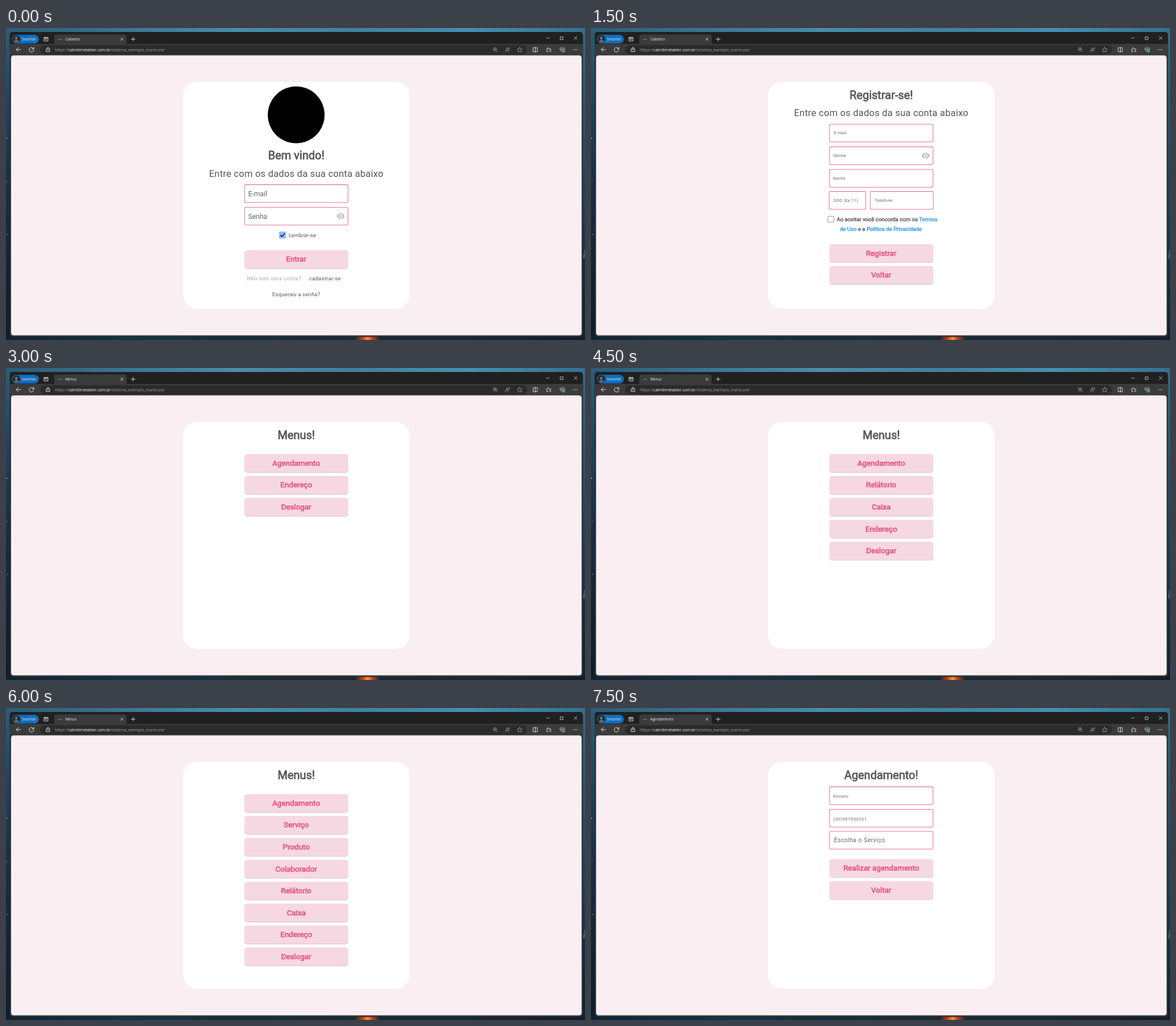
An HTML page with a canvas for the animation above (9 s loop, 1020 by 549 pixels).

```html
<!DOCTYPE html>
<html lang="pt-BR">
<head>
<meta charset="utf-8">
<title>Agendamento</title>
<style>
  html, body { margin: 0; width: 100%; height: 100%; overflow: hidden; background: #0f1c2c; }
  canvas { display: block; width: 1020px; height: 549px; }
</style>
</head>
<body>
<canvas id="stage" width="1020" height="549"></canvas>
<script>
const ctx = document.getElementById('stage').getContext('2d');
const STEP = 1500;
const UI = '"Open Sans", "Noto Sans", sans-serif';
const APP = 'Roboto, Arial, sans-serif';
const MID = 511.3;
const INK = '#555555', PINK = '#e8487f', BORDER = '#e8719b', BLUE = '#2196f3';

function box(x, y, w, h, r, fill, line, width = 1) {
  ctx.beginPath();
  ctx.roundRect(x, y, w, h, r);
  if (fill) { ctx.fillStyle = fill; ctx.fill(); }
  if (line) { ctx.strokeStyle = line; ctx.lineWidth = width; ctx.stroke(); }
}

function disc(x, y, r, fill) {
  ctx.beginPath();
  ctx.arc(x, y, r, 0, Math.PI * 2);
  ctx.fillStyle = fill;
  ctx.fill();
}

function path(d, color, width = 1, fill = false) {
  const p = new Path2D(d);
  if (fill) { ctx.fillStyle = color; ctx.fill(p); return; }
  ctx.strokeStyle = color;
  ctx.lineWidth = width;
  ctx.stroke(p);
}

// Heavy text is the regular face with a thin outline.
function text(s, x, y, size, { color = INK, font = APP, gap = 0, align = 'left', heavy = false } = {}) {
  ctx.font = `${size}px ${font}`;
  ctx.letterSpacing = gap + 'px';
  ctx.textAlign = align;
  ctx.fillStyle = color;
  ctx.fillText(s, x, y);
  if (heavy) {
    ctx.strokeStyle = color;
    ctx.lineWidth = size / 26;
    ctx.lineJoin = 'round';
    ctx.strokeText(s, x, y);
  }
  return x + ctx.measureText(s).width;
}

function gradient(x0, y0, x1, y1, ...colors) {
  const g = ctx.createLinearGradient(x0, y0, x1, y1);
  colors.forEach((c, i) => g.addColorStop(i / (colors.length - 1), c));
  return g;
}

function wallpaper() {
  ctx.fillStyle = gradient(0, 0, 0, 549, '#2c5c78', '#1d4460', '#15304a', '#10253a', '#0d1d2d');
  ctx.fillRect(0, 0, 1020, 549);
  ctx.fillStyle = gradient(0, 0, 1020, 0, '#2c5b76', '#3b7592', '#4b8ca9', '#417f9e', '#488eb0', '#35708f');
  ctx.fillRect(0, 0, 1020, 8);
  ctx.fillStyle = gradient(0, 0, 0, 549, '#32708f', '#27597a', '#1d4564', '#16304a', '#101f31');
  ctx.fillRect(1014, 0, 6, 549);
  ctx.fillStyle = gradient(0, 0, 1020, 0, '#0e2232', '#123246', '#15303f', '#182a37', '#15283a', '#101c2b');
  ctx.fillRect(0, 541, 1020, 8);
  const glow = ctx.createRadialGradient(637, 547, 0, 637, 547, 22);
  glow.addColorStop(0, '#ff9a45');
  glow.addColorStop(0.35, '#c8451f');
  glow.addColorStop(1, '#c8451f00');
  ctx.fillStyle = glow;
  ctx.fillRect(612, 542, 50, 7);
  disc(1, 194, 1, '#a9bccb');
  disc(2, 270, 1.2, '#8a3d38');
  disc(3, 363, 0.9, '#7f93a4');
  path('M1017 404L1020 390M1018 406L1020 398', '#7d8a95', 0.8);
}

function toolbarIcons() {
  const c = '#e4e4e4', dim = '#a5a5a5';
  ctx.lineCap = 'round';
  path('M26 38H18M21.5 34.5L18 38L21.5 41.5', c);
  path('M48.6 36.5A4 4 0 1 0 49 38.8M49 34V36.8H46.2', c);
  path('M71.2 37H77V41.5H71.2ZM72.4 37V35.7A1.7 1.7 0 0 1 75.8 35.7V37M74 39V39.4', c, 0.9);
  path('M864.4 37.4A3 3 0 1 1 858.4 37.4A3 3 0 1 1 864.4 37.4M863.6 39.6L866 42M860 37.4H862.8M861.4 36V38.8', dim, 0.8);
  path('M879.5 42L882.5 34.5L885.5 42M880.6 39.4H884.4M885.3 35Q886.4 36 885.3 37.4M886.6 34Q888.4 36 886.6 38.3', dim, 0.8);
  const star = (x, y, r) => {
    let d = '';
    for (let i = 0; i < 10; i++) {
      const a = -Math.PI / 2 + i * Math.PI / 5, q = i % 2 ? r * 0.48 : r;
      d += (i ? 'L' : 'M') + (x + q * Math.cos(a)) + ' ' + (y + q * Math.sin(a));
    }
    return d + 'Z';
  };
  path(star(905, 38.6, 4.8), dim, 0.8);
  path('M929 34.8H936V41.6H929ZM932.5 34V42.5', c, 0.9);
  path('M955 41L952.7 42L953.1 39.1L951.8 37.2L954 36.8L955.3 34.3L956.6 36.8H960M957.4 39H960M957.4 41.3H960', c, 0.9);
  path('M980 42L976.3 38.3C974.6 35.9 977.7 33 980 35.9C982.3 33 985.4 35.9 983.7 38.3ZM976.6 38H978.7L979.8 36.8L981 39.3L981.8 38H983', c, 0.8);
  disc(982.6, 40.8, 2.4, '#43a854');
  [1000, 1003, 1006].forEach(x => disc(x, 38.3, 0.8, c));
  path('M67.3 16.5H74V23H67.3ZM67.3 18H74M69.2 18V20.2H72', c, 0.9);
  path('M202.3 17.8L206.3 21.8M206.3 17.8L202.3 21.8', c, 0.9);
  path('M220.5 19.7H227.5M224 16.2V23.2', c, 0.9);
  path('M952 17.8H957M976.7 15.7H981.3V20.3H976.7ZM1001 15.2L1006 20.2M1006 15.2L1001 20.2', c, 0.8);
  ctx.lineCap = 'butt';
}

function browser(title) {
  box(6.5, 7, 1010, 536.5, 5, '#202020');
  ctx.fillStyle = '#3b3b3b';
  ctx.fillRect(7, 28, 1009, 20);
  box(7, 44, 1009, 499, [0, 0, 5, 5], '#3b3b3b');
  box(85, 11.5, 127.5, 18, [4, 4, 0, 0], '#3b3b3b');
  box(10.5, 12, 47.5, 15.2, 7.6, '#0f6cbd');
  disc(18.4, 19.7, 6.6, '#262626');
  disc(18.2, 17.8, 2.3, '#85786f');
  path('M14.3 24.6Q14.8 20.5 18.3 20.5Q21.9 20.5 22.5 24.6Q18.4 27 14.3 24.6Z', '#6b6765', 1, true);
  const light = { font: UI, color: '#f4f4f4' };
  text('SoloVisit', 28, 22.1, 6.3, light);
  path('M91.5 20H98.5', '#9b9b9b', 0.9);
  text(title, 104.5, 22.1, 6.2, light);
  box(60, 30.2, 858, 16.2, 8, '#2b2b2b');
  const dim = { font: UI, color: '#a3a3a3' };
  let x = text('https://', 86, 40.8, 7, dim);
  x = text('calmtimetabler.com.br', x, 40.8, 7, { font: UI, color: '#ffffff' });
  text('/sistema_exemplo_manicure/', x, 40.8, 7, dim);
  toolbarIcons();
  box(9, 48.3, 1005, 492.5, 4.5, '#f9eff3');
  box(312, 95, 399, 399, 24, '#ffffff');
}

const title = (s, y) => text(s, MID, y, 20, { align: 'center', heavy: true, color: '#585858' });
const lead = y => text('Entre com os dados da sua conta abaixo', MID, y, 16.5, { align: 'center', gap: 0.25 });

function button(label, y) {
  box(420, y + 0.9, 183, 32, 5, '#d9c3cb');
  box(420, y, 183, 32, 5, '#f6d8e2');
  text(label, MID, y + 20.4, 13.45, { align: 'center', heavy: true, color: PINK });
}

function field(label, y, size = 7.6, { x = 420.3, w = 182.2, pad = 6.5, gap = 0.25, base = 18.2 } = {}) {
  box(x, y, w, 31.3, 2.2, '#ffffff', BORDER, 1.05);
  text(label, x + pad, y + base, size, { gap, color: '#666666' });
}

function eye(y) {
  path(`M582.3 ${y}Q585 ${y - 5} 589.5 ${y - 5}T596.7 ${y}Q594 ${y + 5} 589.5 ${y + 5}T582.3 ${y}Z`, '#bcbec5', 1, true);
  disc(589.5, y, 3.3, '#ffffff');
  disc(589.5, y, 2, '#bcbec5');
}

function login() {
  disc(511.2, 152.8, 50, '#000000');
  title('Bem vindo!', 231);
  lead(261.8);
  field('E-mail', 275.6, 12, { gap: 0, base: 20 });
  field('Senha', 315.5, 12, { gap: 0, base: 20 });
  eye(331);
  box(481, 358.2, 12.2, 12.2, 1.2, '#8fbdf6');
  path('M483.3 364.4L486 367.1L491 361.4', '#14253d', 1.5);
  text('Lembrar-se', 497.7, 367.5, 9.5, { gap: 0.05 });
  button('Entrar', 391);
  text('Não tem uma conta?', 424.3, 443.7, 9.6, { gap: 0.4, heavy: true, color: '#c3c3c3' });
  text('cadastrar-se', 534, 443.7, 9.4, { gap: 0.34 });
  text('Esqueceu a senha?', MID, 472, 9.4, { gap: 0.27, align: 'center' });
}

function register() {
  title('Registrar-se!', 124.8);
  lead(155.4);
  field('E-mail', 169.2, 7.6, { pad: 7.7 });
  field('Senha', 209.1);
  eye(224.5);
  field('Nome', 248.9);
  field('DDD (Ex:11)', 287.6, 7.6, { x: 419.5, w: 64.5, pad: 7.8 });
  field('Telefone', 287.6, 7.6, { x: 492.1, w: 111, pad: 7.8 });
  box(417.2, 331.2, 10.6, 10.6, 1.2, '#ffffff', '#858585', 0.9);
  const dark = { heavy: true, color: '#505050' }, link = { heavy: true, color: BLUE };
  let x = text('Ao aceitar você concorda com os ', 433, 340.3, 9.62, dark);
  text('Termos', x, 340.3, 9.62, link);
  x = text('de Uso', 438.4, 357.1, 9.62, link);
  x = text(' e a ', x, 357.1, 9.62, dark);
  text('Política de Privacidade', x, 357.1, 9.62, link);
  button('Registrar', 380.3);
  button('Voltar', 418.8);
}

function menu(items) {
  title('Menus!', 124.8);
  items.forEach((s, i) => button(s, 151.5 + i * 38.55));
}

function booking() {
  title('Agendamento!', 124.8);
  field('Renato', 138.6, 7.6, { gap: 0.55, base: 19.8 });
  field('(00)987000321', 178.5, 7.6, { gap: 0.55, base: 19.8 });
  field('Escolha o Serviço', 217, 10.7, { pad: 7.7, gap: 0.35, base: 19.3 });
  button('Realizar agendamento', 265.9);
  button('Voltar', 304.5);
}

const screens = [
  ['Cadastro', login],
  ['Cadastro', register],
  ['Menus', () => menu(['Agendamento', 'Endereço', 'Deslogar'])],
  ['Menus', () => menu(['Agendamento', 'Relátorio', 'Caixa', 'Endereço', 'Deslogar'])],
  ['Menus', () => menu(['Agendamento', 'Serviço', 'Produto', 'Colaborador', 'Relátorio', 'Caixa', 'Endereço', 'Deslogar'])],
  ['Agendamento', booking]
];

const start = performance.now();
function frame() {
  const t = Math.max(0, performance.now() - start);
  const [tab, draw] = screens[Math.floor(t / STEP) % screens.length];
  wallpaper();
  browser(tab);
  draw();
  requestAnimationFrame(frame);
}
frame();
</script>
</body>
</html>
```
